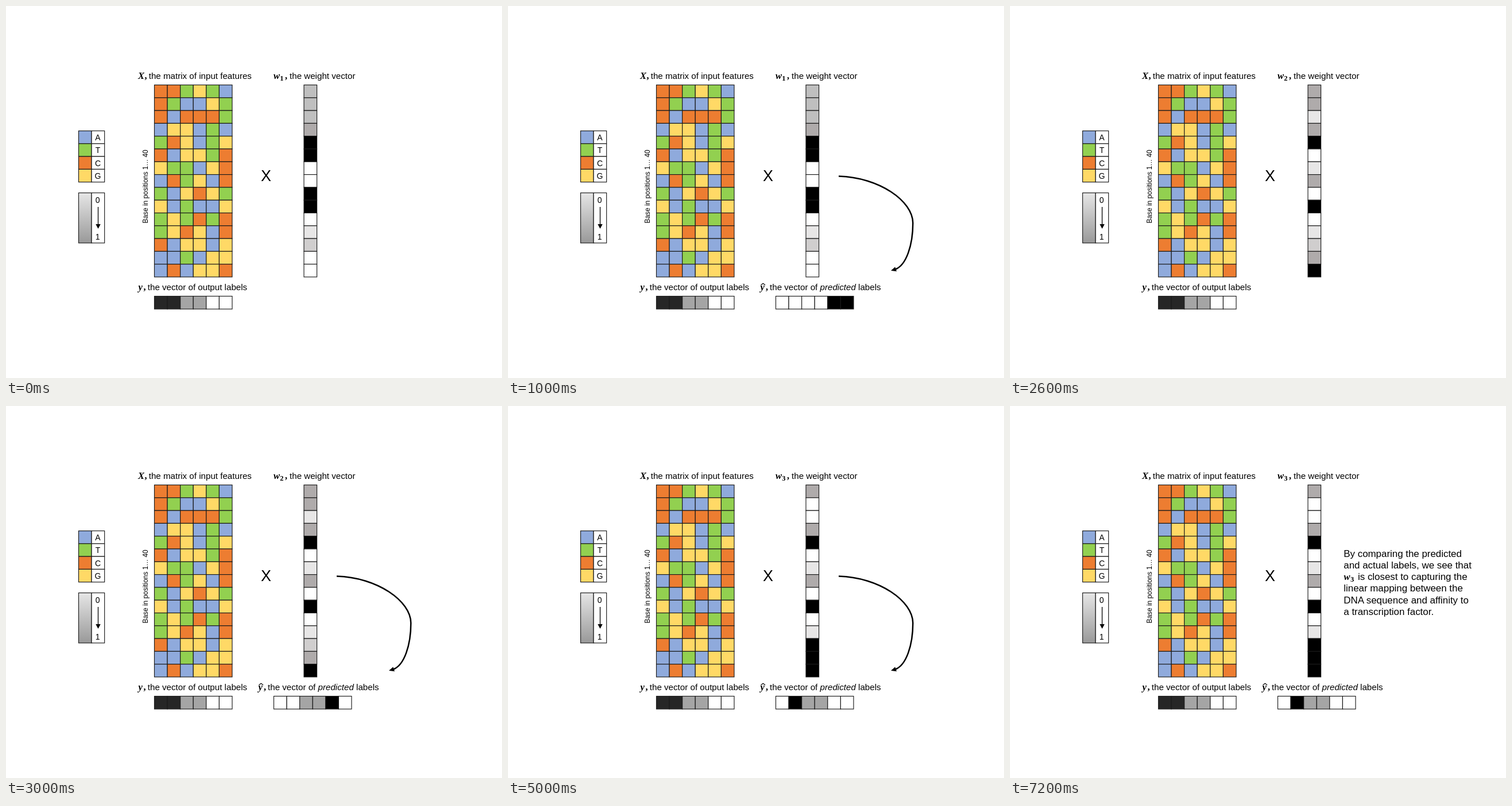
These frames come from a looping animation (864 by 648 pixels, 8000 ms). An HTML page:

```html
<!DOCTYPE html>
<html lang="en">
<head>
<meta charset="utf-8">
<title>Weight vectors</title>
<style>
  html, body { margin: 0; width: 100%; height: 100%; overflow: hidden; background: #fff; }
  svg { display: block; width: 864px; height: 648px; }
  text { font-family: "Liberation Sans", Arial, sans-serif; font-size: 15.15px; fill: #000; white-space: pre; }
  .math { font: italic bold 16.5px "Liberation Serif", "Times New Roman", serif; }
  .sub { font: bold 12.5px "Liberation Serif", "Times New Roman", serif; }
  .comma { font: bold 16px "Liberation Serif", "Times New Roman", serif; }
  .key { font-size: 14px; text-anchor: middle; }
  .note text:not(.math):not(.sub) { font-size: 16.9px; }
  .cell { stroke: #1a1a1a; stroke-width: 1.15; }
</style>
</head>
<body>
<svg id="stage" viewBox="0 0 864 648">
  <defs>
    <linearGradient id="shade" x1="0" y1="0" x2="0" y2="1">
      <stop offset="0" stop-color="#e6e6e6"/>
      <stop offset="1" stop-color="#999"/>
    </linearGradient>
  </defs>
</svg>
<script>
const stage = document.getElementById('stage');
const COLORS = {
  A: '#8faadc', T: '#92d050', C: '#ed7d31', G: '#ffd966',
  k: '#000', d: '#262626', m: '#a5a5a5', a: '#afabab', b: '#bfbfbf', c: '#d0cece', e: '#e7e6e6', w: '#fff'
};
const MATRIX = [
  'CCTGTA', 'CTAAGT', 'CACCCT', 'AGGATA', 'TCGATG',
  'CAGGTC', 'GTTAGC', 'ACTGAC', 'TAGCGT', 'GATAAG',
  'TGTCTC', 'TGCGAC', 'CAGGAG', 'AATAGG', 'ACAGGC'
];
const ROUNDS = [
  { weights: 'bbbakkwwkkwecww', labels: 'wwwwkk' },
  { weights: 'aaeakweawkwecak', labels: 'wwmmkw' },
  { weights: 'awwakweawkwekkk', labels: 'wkmmww' }
];
const STEP = 1000, LOOP = 8000, LAST = 6;
const CELL_W = 22.58, CELL_H = 22.3;

function add(parent, tag, attrs, content) {
  const node = document.createElementNS('http://www.w3.org/2000/svg', tag);
  for (const key in attrs) node.setAttribute(key, attrs[key]);
  if (content !== undefined) node.textContent = content;
  parent.appendChild(node);
  return node;
}
const group = (cls = '') => add(stage, 'g', { class: cls });
const write = (parent, x, y, content, cls = '') => add(parent, 'text', { x, y, class: cls }, content);
const box = (parent, x, y, width, height, fill) =>
  add(parent, 'rect', { x, y, width, height, fill, class: 'cell' });

function grid(parent, x, y, rows, h = CELL_H) {
  return rows.flatMap((row, r) => [...row].map((code, c) =>
    box(parent, x + c * CELL_W, y + r * h, CELL_W, h, COLORS[code])));
}
function paint(cells, codes) {
  cells.forEach((cell, i) => cell.setAttribute('fill', COLORS[codes[i]]));
}
function heading(parent, x, y, symbol, commaX, textX, label) {
  write(parent, x, y, symbol, 'math');
  write(parent, commaX, y, ',', 'comma');
  return write(parent, textX, y, label);
}

// Legend
const base = group();
grid(base, 126.5, 217.5, ['Aw', 'Tw', 'Cw', 'Gw']);
[...'ATCG'].forEach((letter, i) => write(base, 160, 234 + i * CELL_H, letter, 'key'));
box(base, 126.5, 325.5, CELL_W, 87.3, 'url(#shade)');
box(base, 126.5 + CELL_W, 325.5, CELL_W, 87.3, '#fff');
write(base, 159.7, 343, '0', 'key');
write(base, 159.7, 407, '1', 'key');
add(base, 'path', { d: 'M160.5 350V382', stroke: '#000', 'stroke-width': 1.3 });
add(base, 'path', { d: 'M156.3 380H164.7L160.5 388Z' });

// Features and labels
heading(base, 230, 126.7, 'X', 241.5, 248.7, 'the matrix of input features');
grid(base, 258.5, 137.5, MATRIX);
add(base, 'text', { transform: 'translate(247 378.5) rotate(-90)', style: 'font-size:11.9px' },
  'Base in positions 1… 40');
add(base, 'text', { x: 444, y: 305, style: 'font-size:27px' }, 'X');
heading(base, 230.5, 494.7, 'y', 239.5, 246.8, 'the vector of output labels');
grid(base, 258.5, 505.5, ['ddmmww'], 22.4);

// Weights
heading(base, 466, 126.7, 'w', 486, 494, 'the weight vector');
const index = write(base, 477.3, 129.5, '1', 'sub');
const weightCells = grid(base, 519, 137.5, [...ROUNDS[0].weights]);

// Prediction
const predicted = group();
const title = heading(predicted, 439.5, 494.7, 'y', 449, 456, 'the vector of ');
add(title, 'tspan', { 'font-style': 'italic' }, 'predicted');
add(title, 'tspan', {}, ' labels');
add(predicted, 'path', { d: 'M440.5 486L444.3 483.3L448 486', fill: 'none', stroke: '#000', 'stroke-width': 1.2 });
const labelCells = grid(predicted, 466.5, 505.5, [ROUNDS[0].labels], 22.4);

const arrow = group();
add(arrow, 'path', {
  d: 'M576 296.5C647 298.5 705.3 340 705.3 378C705.3 416 694 452 674 459',
  fill: 'none', stroke: '#000', 'stroke-width': 2.5
});
add(arrow, 'path', { d: 'M667 461L674.3 454.5L677 462.2Z' });

// Conclusion
const note = group('note');
[
  'By comparing the predicted', 'and actual labels, we see that', 'is closest to capturing the',
  'linear mapping between the', 'DNA sequence and affinity to', 'a transcription factor.'
].forEach((line, i) => write(note, i === 2 ? 606 : 581.3, 262.7 + i * 20.2, line));
write(note, 581.5, 303.1, 'w', 'math');
write(note, 593, 306, '3', 'sub');

let shown = -1;
function show(step) {
  if (step === shown) return;
  shown = step;
  const round = Math.min(2, Math.floor(step / 2));
  const end = step === LAST, odd = step % 2 === 1;
  index.textContent = round + 1;
  paint(weightCells, ROUNDS[round].weights);
  paint(labelCells, ROUNDS[round].labels);
  predicted.style.display = odd || end ? '' : 'none';
  arrow.style.display = odd ? '' : 'none';
  note.style.display = end ? '' : 'none';
}
const start = performance.now();
function tick() {
  const time = (performance.now() - start) % LOOP;
  show(Math.min(LAST, Math.floor(time / STEP)));
  requestAnimationFrame(tick);
}
tick();
</script>
</body>
</html>
```
